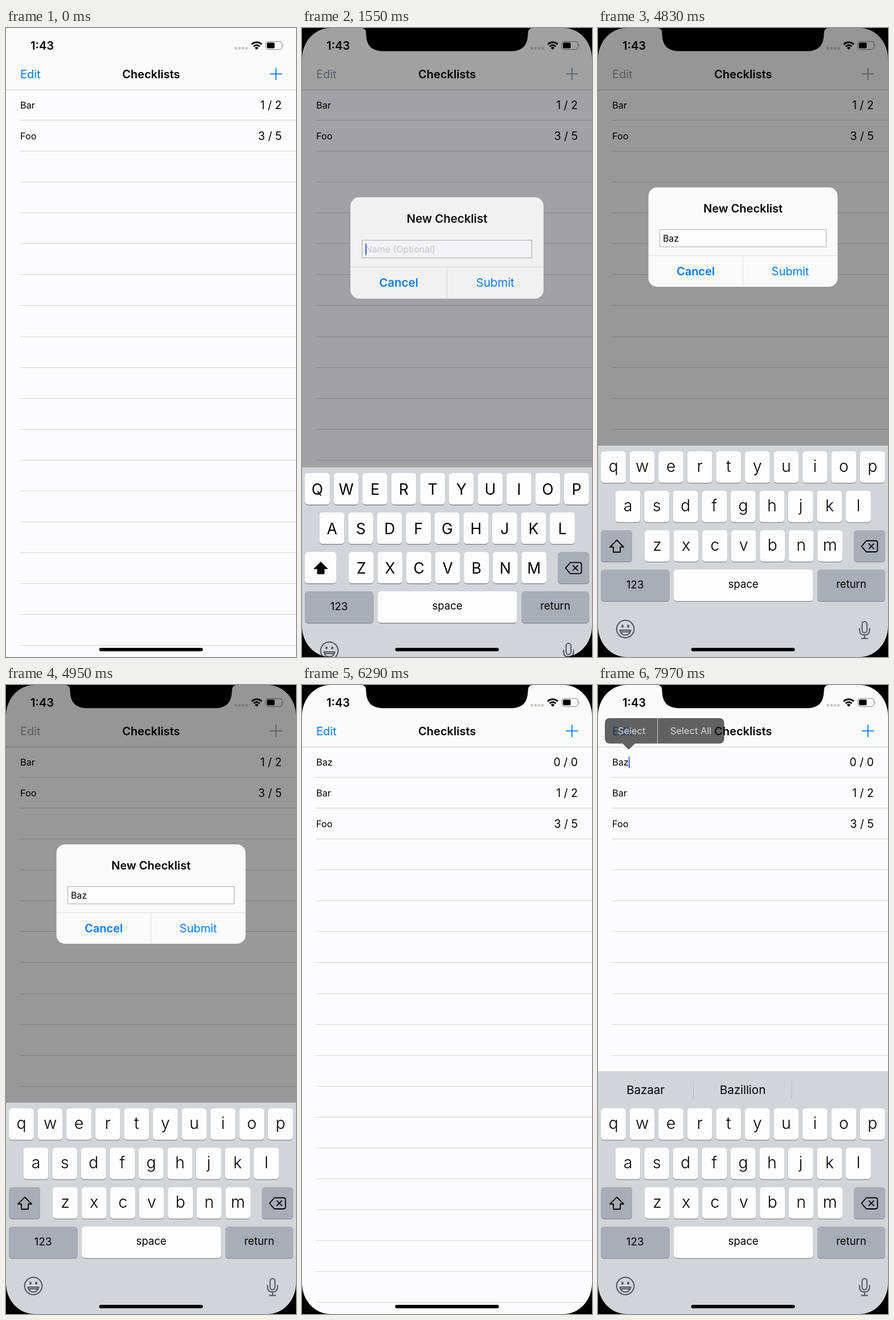
Write an HTML page that moves like this. It is 509 by 1101 pixels and loops after 7.99 s.

```html
<!DOCTYPE html>
<html lang="en">
<head>
<meta charset="utf-8">
<title>Checklists</title>
<style>
  html, body { margin: 0; width: 100%; height: 100%; overflow: hidden; background: #fcfcfe; }
  svg { display: block; width: 100vw; height: 100vh; }
  text { font-family: Inter, Roboto, sans-serif; }
  .line { fill: none; stroke-linecap: round; stroke-linejoin: round; }
</style>
</head>
<body>
<svg id="stage" viewBox="0 0 509 1101"></svg>
<script>
const LOOP = 7990;
const ROW = 54.05;
const KEYBOARD_HEIGHT = 370;
const SUGGESTION_HEIGHT = 55;

// Markup helpers
const text = (x, y, size, str, attrs = '') =>
  `<text x="${x}" y="${y}" font-size="${size}" ${attrs}>${str}</text>`;
const centered = (x, y, size, str, attrs = '') =>
  text(x, y, size, str, `text-anchor="middle" ${attrs}`);
const rect = (x, y, w, h, fill, attrs = '') =>
  `<rect x="${x}" y="${y}" width="${w}" height="${h}" fill="${fill}" ${attrs}/>`;
const path = (d, attrs) => `<path d="${d}" ${attrs}/>`;
const group = (id, body, attrs = '') => `<g id="${id}" ${attrs}>${body}</g>`;
const caret = (id, y) => rect(0, y, 2, 20, '#4068e0', `id="${id}"`);

// List screen
const separatorY = k => Math.floor(161.7 + ROW * k);
const separator = k => rect(24.5, separatorY(k), 485, 1, '#d5d5d0');
const row = (k, name, count, nameId = '') =>
  text(25, 141 + 54 * k, 16.3, name, nameId && `id="${nameId}"`) +
  text(484, 142 + 54 * k, 19.5, count, 'text-anchor="end"') + separator(k);

function statusBar() {
  const dots = [0, 1, 2, 3].map(i => rect(401.3 + i * 6.2, 33.3, 4.4, 4.4, '#c9c9c4', 'rx="1"')).join('');
  const wifi =
    path('M431.2 28.6A12.6 12.6 0 0 1 448.8 28.6', 'class="line" stroke="#000" stroke-width="3" style="stroke-linecap:butt"') +
    path('M434.6 32.2A7.7 7.7 0 0 1 445.4 32.2', 'class="line" stroke="#000" stroke-width="2.8" style="stroke-linecap:butt"') +
    path('M440 38L436.7 34.7A4.7 4.7 0 0 1 443.3 34.7Z', '');
  const battery =
    rect(456, 23.6, 28.5, 14, 'none', 'rx="4" stroke="#96969a" stroke-width="1.2"') +
    rect(458, 25.6, 13.5, 10, '#000', 'rx="2"') +
    path('M486.3 28.2Q488.4 30.6 486.3 33Z', 'fill="#96969a"');
  return centered(63.5, 37.5, 20, '1:43', 'font-weight="600"') + dots + wifi + battery;
}

function listScreen() {
  const emptyRows = Array.from({ length: 16 }, (_, i) => separator(i + 2)).join('');
  return rect(0, 0, 509, 1101, '#fcfcfe') + emptyRows +
    group('newRow', row(0, 'Baz', '0 / 0', 'newName') + caret('rowCaret', 125.3)) +
    group('oldRows', row(0, 'Bar', '1 / 2') + row(1, 'Foo', '3 / 5')) +
    rect(0, 0, 509, 108, '#fafafa') + rect(0, 108, 509, 1, '#cdcdd2') + statusBar() +
    centered(254.7, 88, 20, 'Checklists', 'font-weight="600"') +
    group('tint', text(25, 88, 20, 'Edit') +
      path('M463 80.3H484.5M473.75 69.5V91', 'id="plus" stroke="currentColor" stroke-width="1.8"'),
      'fill="currentColor"');
}

// Alert
const alertBox = () =>
  rect(88.5, 279, 332, 174, '#fafafb', 'rx="15"') +
  centered(254.5, 323, 20, 'New Checklist', 'font-weight="600"') +
  rect(108.5, 352.8, 292, 30.2, '#fdfdff', 'stroke="#a9a9a9" stroke-width="1"') +
  text(114, 374, 15.6, 'Name (Optional)', 'id="placeholder" fill="#c6c6ca"') +
  text(114, 374, 15.8, '', 'id="typed"') + caret('fieldCaret', 358.3) +
  rect(88.5, 398, 332, 1, '#dcdcde') + rect(254, 398, 1, 55, '#dcdcde') +
  centered(171.5, 433, 20, 'Cancel', 'font-weight="600" fill="#007aff"') +
  centered(337.5, 433, 20, 'Submit', 'fill="#007aff"');

// Keyboard
const key = (x, y, w, fill = '#fdfdfe') =>
  rect(x, y + 1.3, w, 55, '#888b91', 'rx="5.5"') + rect(x, y, w, 55, fill, 'rx="5.5"');

const LETTER_ROWS = [['qwertyuiop', 5, 10], ['asdfghjkl', 30.6, 79], ['zxcvbnm', 82, 148]];
const eachLetter = draw => LETTER_ROWS.map(([letters, x, y]) =>
  [...letters].map((c, i) => draw(c, x + i * 50.55, y)).join('')).join('');

const SHIFT_ARROW = 'M33 165.5L45 177.5H39V186.5H27V177.5H21Z';

function keyboard() {
  const dark = '#a8adb8';
  const icon = 'class="line" stroke="#50555b" stroke-width="2"';
  const upper = key(5, 148, 55) + path(SHIFT_ARROW, 'stroke="#000" stroke-linejoin="round"') +
    eachLetter((c, x, y) => centered(x + 22, y + 37.5, 26.5, c.toUpperCase()));
  const lower = key(5, 148, 55, dark) + path(SHIFT_ARROW, 'class="line" stroke="#000" stroke-width="1.8"') +
    eachLetter((c, x, y) => centered(x + 22, y + 36, 28.5, c, 'font-weight="300"'));
  const backspace = path('M471 166.5H487Q490.5 166.5 490.5 170V182.5Q490.5 186 487 186H471L462.5 176.3Z' +
    'M475.5 171.8L484 180.3M484 171.8L475.5 180.3', 'class="line" stroke="#000" stroke-width="1.8"');
  const smiley = `<circle cx="48" cy="321" r="15.3" ${icon}/>` +
    '<g fill="#50555b"><ellipse cx="43" cy="316" rx="1.9" ry="2.7"/><ellipse cx="53" cy="316" rx="1.9" ry="2.7"/></g>' +
    path('M38.5 323H57.5Q56 331.5 48 331.5T38.5 323ZM40 326H56', icon);
  const mic = rect(463.5, 308, 8.6, 19.5, 'none', `rx="4.3" ${icon}`) +
    path('M459 320V323Q459 331.5 467.8 331.5T476.6 323V320M467.8 332V337.5M462.5 337.5H473', icon);
  const suggestions = centered(83.5, 40, 20.5, 'Bazaar') + centered(254, 40, 20.5, 'Bazillion') +
    rect(167, 17, 1, 31, '#b7bbc2') + rect(339.5, 17, 1, 31, '#b7bbc2');
  return rect(0, 0, 509, 440, '#d1d4d9') + group('suggestions', suggestions) +
    group('keys',
      eachLetter((c, x, y) => key(x, y, 43.8)) + group('upper', upper) + group('lower', lower) +
      key(449, 148, 55, dark) + backspace +
      key(5, 217, 120.5, dark) + centered(65, 250, 19, '123') +
      key(133, 217, 244.5) + centered(255, 249, 18.5, 'space') +
      key(385, 217, 119, dark) + centered(444.5, 249, 18.5, 'return') + smiley + mic);
}

// Edit menu above the new row
const editMenu = () =>
  path('M21 58H212.5Q221.5 58 221.5 67V93.5Q221.5 102.5 212.5 102.5H65L54 113L43 102.5H21Q12 102.5 12 93.5V67Q12 58 21 58Z',
    'fill="#1e1e1e" fill-opacity=".69"') +
  rect(104, 58, 1, 44.5, '#c8c8c8') +
  centered(59, 86, 16.5, 'Select', 'fill="#d6d6d6"') + centered(163, 86, 16.5, 'Select All', 'fill="#d6d6d6"');

const bezel = () =>
  path('M0 0H509V1101H0ZM50 0A50 54 0 0 0 0 54V1047A50 54 0 0 0 50 1101H459A50 54 0 0 0 509 1047V54A50 54 0 0 0 459 0Z',
    'fill-rule="evenodd"') +
  path('M103 0C111 0 112.5 4 112.5 11C113 30 122 40.5 143 40.5H367C387 40.5 396 30 396.5 11C397 4 398 0 406 0Z', '');

document.getElementById('stage').innerHTML =
  listScreen() + rect(0, 0, 509, 1101, '#000', 'id="dim"') +
  group('alert', alertBox()) + group('keyboard', keyboard()) + group('menu', editMenu()) +
  group('bezel', bezel()) + rect(163.5, 1085, 182, 6, '#000', 'rx="3"');

const ui = {};
document.querySelectorAll('[id]').forEach(el => ui[el.id] = el);

// Motion
const clamp = v => Math.min(1, Math.max(0, v));
const ramp = (t, from, to) => clamp((t - from) / (to - from));
const ease = v => v * v * (3 - 2 * v);
const mix = (a, b, p) => a + (b - a) * p;
function spring(t, start) {
  const x = Math.max(0, t - start) * 0.01826;
  return 1 - (1 + x) * Math.exp(-x);
}
const show = (el, visible) => el.style.display = visible ? '' : 'none';
const move = (el, y) => el.setAttribute('transform', `translate(0 ${y})`);

const ALERT_IN = 1340, ALERT_OUT = 5003, EDIT_ROW = 7210;
const TYPING = [[2540, 'B'], [3480, 'Ba'], [4180, 'Baz']];
const CARET_ON = [[1340, 2110], [2540, 3100], [3480, 4010], [4180, 4550]];

function render(t) {
  const opening = spring(t, ALERT_IN);
  const closing = spring(t, ALERT_OUT);
  const presence = opening * (1 - closing);

  // List
  const inserted = ease(ramp(t, 5420, 5740));
  ui.newRow.style.opacity = inserted;
  move(ui.oldRows, 54 * inserted);
  const [r, g, b] = [0, 122, 255].map(c => Math.round(mix(c, 153, presence)));
  ui.tint.style.color = `rgb(${r},${g},${b})`;
  ui.plus.style.opacity = 1 - 0.8 * ramp(t, 1080, 1120) * (1 - ramp(t, 1160, 1340));
  show(ui.rowCaret, t >= EDIT_ROW);
  ui.rowCaret.setAttribute('x', 25 + ui.newName.getComputedTextLength());

  // Alert and its text field
  ui.dim.style.opacity = 0.4 * presence;
  ui.alert.style.opacity = presence;
  const scale = mix(1.2, 1, opening);
  ui.alert.setAttribute('transform',
    `translate(254.5 ${mix(550.5, 366, opening)}) scale(${scale}) translate(-254.5 -366)`);
  const typed = TYPING.reduce((now, [at, str]) => t >= at ? str : now, '');
  if (ui.typed.textContent !== typed) ui.typed.textContent = typed;
  show(ui.placeholder, !typed);
  ui.fieldCaret.setAttribute('x', 114 + (typed ? ui.typed.getComputedTextLength() : 0));
  ui.fieldCaret.style.opacity = Math.max(...CARET_ON.map(([on, off]) =>
    t < on ? 0 : 1 - ramp(t, off, off + 60)));

  // Keyboard
  const editing = t >= EDIT_ROW;
  const height = KEYBOARD_HEIGHT + (editing ? SUGGESTION_HEIGHT : 0);
  move(ui.keyboard, 1101 - height * (editing ? spring(t, EDIT_ROW) : presence));
  move(ui.keys, editing ? SUGGESTION_HEIGHT : 0);
  show(ui.suggestions, editing);
  show(ui.upper, !typed);
  show(ui.lower, typed);

  ui.menu.style.opacity = ramp(t, 7720, 7960);
  show(ui.bezel, t >= 1300);
}

function frame() {
  render(performance.now() % LOOP);
  requestAnimationFrame(frame);
}
frame();
</script>
</body>
</html>
```
